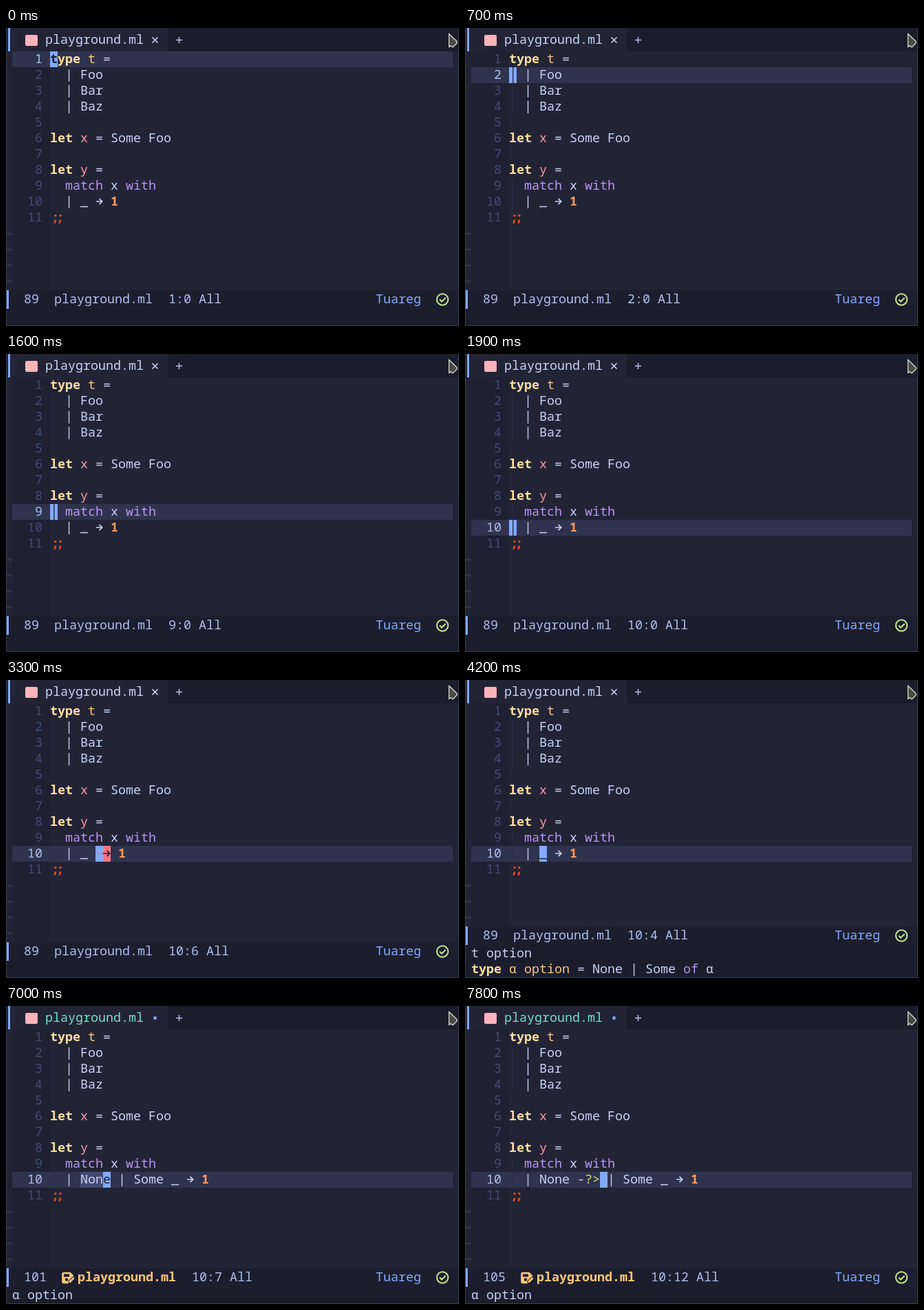
Recreate the animation shown at these times as an HTML page. Size 658 px wide and 433 px high, loop 8 s.

```html
<!DOCTYPE html>
<html lang="en">
<head>
<meta charset="utf-8">
<title>Editor session</title>
<style>
html, body { margin: 0; width: 100%; height: 100%; overflow: hidden; background: #222436; }
svg { display: block; width: 658px; height: 433px; }
text { font: 18.333px "Noto Sans Mono", "DejaVu Sans Mono", monospace; white-space: pre; }
.b { font-weight: 700; }
</style>
</head>
<body>
<svg id="stage" viewBox="0 0 658 433"></svg>
<script>
const LOOP = 8000, CELL = 11, LEFT = 64, TOP = 34, ROW = 23;
const C = {
  bg: '#222436', bar: '#1b1d2c', mode: '#1c1e2e', gutter: '#1f2133', line: '#2f334d',
  text: '#c8d3f5', status: '#b0bfee', num: '#444a73', blue: '#82aaff', dark: '#1b1d2c',
  key: '#ffdf9f', type: '#ffc382', name: '#ff98a4', purple: '#b994f1', orange: '#ff995e',
  end: '#f4511e', red: '#ff757f', teal: '#77e0c6', gold: '#ffc777', green: '#c3e88d',
  guide: '#2a2d44', mark: '#444a73', edge: '#394148'
};

// Code as [row, column, text, colour, bold]; row 10 is built from the state.
const CODE = [
  [1, 0, 'type', C.key, 1], [1, 5, 't', C.type], [1, 7, '=', C.text],
  [2, 2, '| Foo', C.text], [3, 2, '| Bar', C.text], [4, 2, '| Baz', C.text],
  [6, 0, 'let', C.key, 1], [6, 4, 'x', C.name], [6, 6, '= Some Foo', C.text],
  [8, 0, 'let', C.key, 1], [8, 4, 'y', C.name], [8, 6, '=', C.text],
  [9, 2, 'match', C.purple], [9, 8, 'x', C.text], [9, 10, 'with', C.purple]
];
const GUIDES = [2, 3, 4, 9, 10];

// Each step changes part of the editor state.
const STEPS = [
  [0, { row: 1, col: 0, pat: '_', size: 89, wide: false, bad: false, mod: false, mark: false, echo: '' }],
  [700, { row: 2 }],
  [1400, { row: 4 }],
  [1500, { row: 7 }],
  [1600, { row: 9 }],
  [1900, { row: 10 }],
  [2200, { col: 9, wide: true }],
  [2600, { col: 8 }],
  [3000, { col: 7 }],
  [3100, { col: 6 }],
  [3300, { bad: true }],
  [3400, { col: 5 }],
  [3500, { bad: false, wide: false }],
  [3700, { col: 4 }],
  [4200, { echo: 'type' }],
  [5000, { echo: '' }],
  [5500, { pat: 'None | Some _' }],
  [5600, { mod: true, size: 101 }],
  [6100, { mark: true }],
  [6500, { col: 7, mark: false }],
  [7000, { mark: true, echo: 'α option' }],
  [7200, { col: 9, size: 102, pat: 'None  | Some _', mark: false }],
  [7500, { col: 10, size: 103, pat: 'None - | Some _' }],
  [7800, { col: 12, size: 105, pat: 'None -?> | Some _' }]
];

const rect = (x, y, w, h, fill, r = 0) =>
  `<rect x="${x}" y="${y}" width="${w}" height="${h}" rx="${r}" fill="${fill}"/>`;
const path = (d, stroke, w, fill = 'none') =>
  `<path d="${d}" stroke="${stroke}" stroke-width="${w}" fill="${fill}"/>`;
const label = (x, y, s, fill, bold) =>
  `<text x="${x}" y="${y}" fill="${fill}"${bold ? ' class="b"' : ''}>${s.replace(/>/g, '&gt;')}</text>`;
const colX = c => LEFT + c * CELL;
const rowY = r => TOP + (r - 1) * ROW;

function stateAt(t) {
  return Object.assign({}, ...STEPS.filter(s => s[0] <= t).map(s => s[1]));
}

function rowTen(s) {
  const out = [[10, 2, '|', C.text]];
  let col = 4;
  for (const part of s.pat.split(/(\?>)/)) {
    if (part) out.push([10, col, part, part === '?>' ? '#e5d97a' : C.text]);
    col += part.length;
  }
  out.push([10, col + (s.wide ? 4 : 3), '1', C.orange, 1]);
  return out;
}

function arrow(s) {
  const x = colX(5 + s.pat.length), y = rowY(10) + 11;
  const cell = c => s.bad ? (s.col === c ? C.red : C.dark)
    : s.row === 10 && s.col === c ? C.dark : C.text;
  const hx = s.wide ? x + CELL : x;
  const tail = s.wide ? path(`M${x + 2} ${y}H${hx}`, cell(6), 1.7) : '';
  const head = s.wide ? cell(7) : C.text;
  return tail + path(`M${s.wide ? hx : hx + 1} ${y}H${hx + 9.5}M${hx + 5.5} ${y - 4.2}L${hx + 9.7} ${y}L${hx + 5.5} ${y + 4.2}`, head, 1.7);
}

function tabBar(s) {
  return rect(0, 0, 658, TOP, C.bar) + rect(6, 0, 229, TOP, C.bg) + rect(3, 0, 3, TOP, C.blue) +
    rect(28, 10, 18, 16, '#ffb3ba', 2) +
    label(57, 23, 'playground.ml', s.mod ? C.teal : C.text) +
    (s.mod ? `<circle cx="216.5" cy="17.5" r="2.4" fill="${C.blue}"/>`
      : path('M212.5 13.5l8 8m0-8l-8 8', C.text, 1.6)) +
    path('M247 17.5h9m-4.5-4.5v9', C.status, 1.5) +
    path('M643.5 8.5L655 19.5V22L649 28L646 25.5L643.5 27.5Z', '#e4e4dc', 1.2, '#4b4b45');
}

function editor(s) {
  const rows = CODE.concat(rowTen(s)), y = rowY(s.row);
  let out = rect(9, TOP, 55, 347, C.gutter) + rect(9, y, 640, ROW, C.line);
  for (const r of GUIDES) out += rect(69, rowY(r), 1, ROW, C.guide);
  for (let r = 1; r <= 11; r++)
    out += label(r > 9 ? 31 : 42, rowY(r) + 17, String(r), r === s.row ? C.status : C.num);
  for (let r = 12; r <= 15; r++)
    out += path(`M1 ${rowY(r) + 13}q2-3.5 4-1t4-1`, '#3a4766', 1.2);
  if (s.mark) out += rect(colX(4), rowY(10), 4 * CELL, ROW, C.mark);
  if (s.bad) out += rect(colX(6), rowY(10), 2 * CELL, ROW, C.red);
  for (const [r, c, str, fill, bold] of rows) out += label(colX(c), rowY(r) + 17, str, fill, bold);
  out += `<text class="b" x="66 73" y="${rowY(11) + 17}" fill="${C.end}">;;</text>`;

  // Block cursor with the character under it redrawn dark.
  out += rect(colX(s.col), y, CELL, ROW, C.blue);
  if (s.col === 0 && GUIDES.includes(s.row)) out += rect(69, y, 1.5, ROW, C.line);
  const hit = rows.find(([r, c, str]) => r === s.row && s.col >= c && s.col < c + str.length);
  if (hit) out += label(colX(s.col), y + 17, hit[2][s.col - hit[1]], C.dark, hit[4]);
  return out + arrow(s);
}

function saveIcon(y) {
  return path(`M84 ${y - 7}h9l4 4v2l-7 7v2h-6q-2 0-2-2v-11q0-2 2-2z`, C.gold, 1.6, C.gold) +
    rect(84, y - 5, 8, 4, C.mode) + `<circle cx="88" cy="${y + 3}" r="2.2" fill="${C.mode}"/>` +
    path(`M91.5 ${y + 7.5}l7-7`, C.mode, 5) + path(`M92 ${y + 7}l6.5-6.5`, C.gold, 3);
}

function modeLine(s) {
  const y = s.echo === 'type' ? 358 : 381, base = y + 19, mid = y + 13.5;
  let out = rect(0, y, 658, 27, C.mode) + rect(0, y + 27, 658, 433 - y - 27, C.bar) +
    rect(1, y, 3, 27, C.blue) + label(26, base, String(s.size), C.status);
  out += s.mod ? saveIcon(mid) + label(104, base, 'playground.ml', C.gold, 1)
    : label(70, base, 'playground.ml', C.status);
  out += label(s.mod ? 270 : 236, base, `${s.row}:${s.col} All`, C.status) +
    label(537, base, 'Tuareg', C.blue) +
    `<circle cx="634" cy="${mid}" r="8.2" fill="none" stroke="${C.green}" stroke-width="2"/>` +
    path(`M630 ${mid}l3 3l5.5-5.5`, C.green, 2);
  return out;
}

function echoArea(s) {
  if (s.echo !== 'type') return s.echo && label(9, 426, s.echo, C.text);
  const at = (c, str, fill, bold) => label(9 + c * CELL, 426, str, fill, bold);
  return label(9, 403, 't option', C.text) + at(0, 'type', C.key, 1) + at(5, 'α option', C.type) +
    at(14, '= None | Some', C.text) + at(28, 'of', C.purple) + at(31, 'α', C.text);
}

const stage = document.getElementById('stage');
let shown = '';

function draw(t) {
  const s = stateAt(t), id = JSON.stringify(s);
  if (id === shown) return;
  shown = id;
  stage.innerHTML = rect(0, 0, 658, 433, C.bg) + tabBar(s) + editor(s) + modeLine(s) + echoArea(s) +
    path('M.5 0V432.5H657.5V0', C.edge, 1);
}

const start = performance.now();
function tick() {
  draw((performance.now() - start) % LOOP);
  requestAnimationFrame(tick);
}
tick();
</script>
</body>
</html>
```
